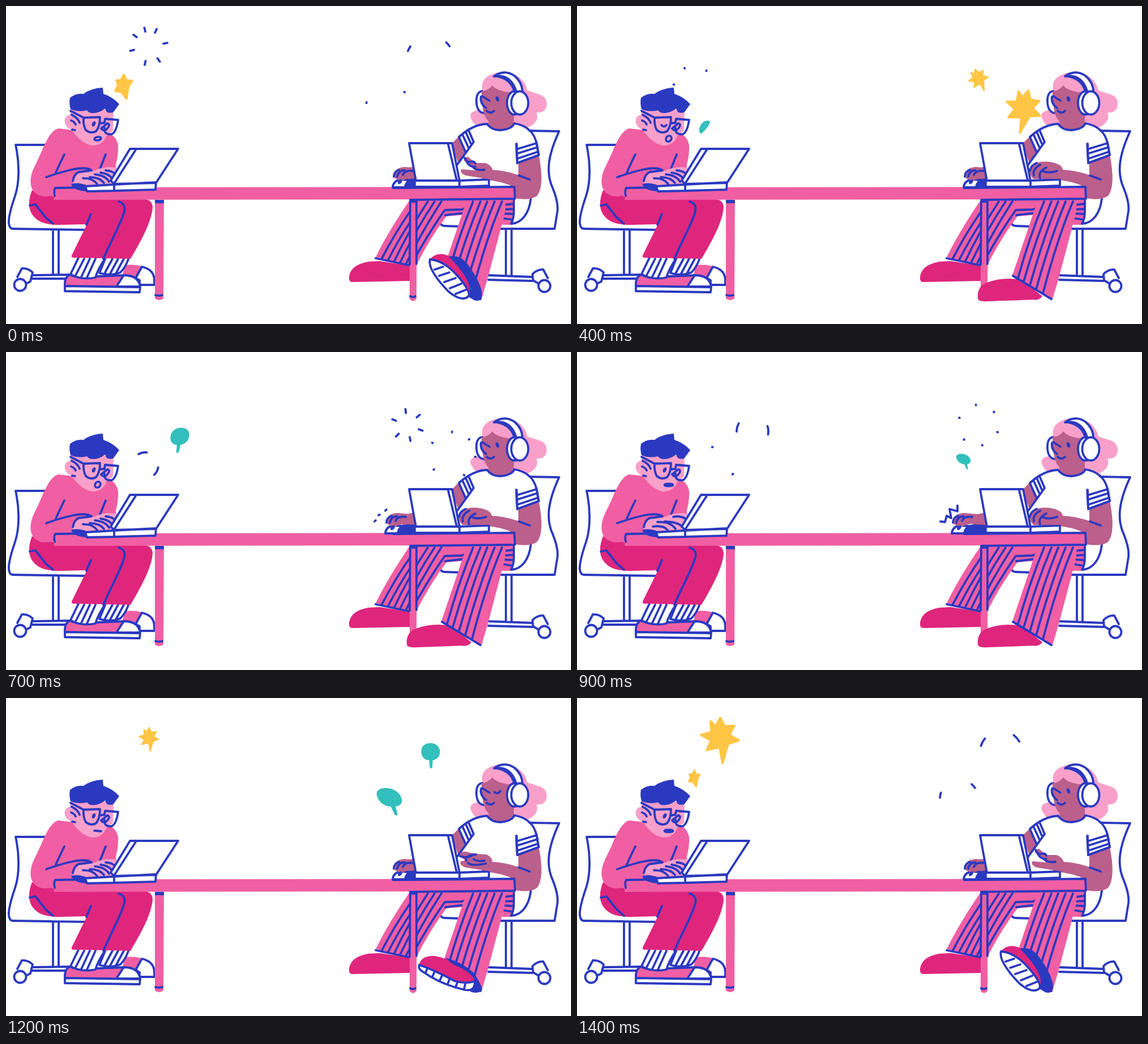
These frames come from a looping animation (998 by 561 pixels, 1.5 s). An HTML page:

```html
<!DOCTYPE html>
<html lang="en">
<head>
<meta charset="utf-8">
<title>Two people working</title>
<style>
html, body { margin: 0; height: 100%; overflow: hidden; background: #fff; }
svg { display: block; width: 100vw; height: 100vh; }
path, ellipse, circle { stroke-linecap: round; stroke-linejoin: round; stroke-width: 3.8; }
.line { fill: none; stroke: #2b39c0; }
.white { fill: #fff; stroke: #2b39c0; }
.blank { fill: #fff; }
.blue { fill: #2b39c0; }
.pink { fill: #f05fa3; }
.deep { fill: #df267d; }
.light { fill: #f8a0ca; }
.skin { fill: #bb5f8c; }
.star { fill: #ffc545; stroke: #ffc545; }
.teal { fill: #33bfbc; }
</style>
</head>
<body>
<svg viewBox="0 0 998 561">
  <!-- chairs -->
  <path class="white" d="M75 245L17 245C23 272 25 308 16 335Q4 370 5 383Q6 393 12 393L145 395M83 396V473M93 396V473M46 475L112 474M46 481L114 481M46 475Q44 478 46 481"/>
  <path class="white" d="M20 478L28 463Q39 462 47 470L43 486L35 490"/>
  <circle class="white" cx="25" cy="492" r="10.5"/>
  <path class="white" d="M922 220L977 221C959 260 952 292 966 322Q976 347 974 362L969 393L850 393M883 394V474M893 394V474M852 475L930 478M852 483L930 485M766 380Q768 388 775 388L804 389M927 340C924 366 911 383 893 384"/>
  <path class="white" d="M957 480L949 465Q939 464 930 473L931 484L943 491"/>
  <circle class="white" cx="951" cy="494" r="10.5"/>

  <!-- left person -->
  <path class="pink" d="M210 457Q232 455 246 462L237 484L205 478Z"/>
  <path class="white" d="M240 460Q262 465 262 484L262 492H236V484L229 480Z"/>
  <path class="pink" d="M104 494Q103 478 113 474Q135 484 160 476L208 475L195 495Z"/>
  <path class="white" d="M208 475Q234 475 237 495H195ZM104 494L237 496L236 505L104 503Z"/>
  <path class="line" d="M104 494Q103 478 113 474Q135 484 160 477L210 475"/>
  <path class="white" d="M176 444L165 471Q183 477 202 470Q212 460 217 444M188 446L174 472M198 446L184 472M208 446L194 472"/>
  <path class="white" d="M128 444L114 473Q132 484 158 479Q162 464 176 444M138 446L123 475M148 446L133 478M158 446L143 479"/>
  <path class="deep" d="M46 325C36 350 40 370 62 381Q75 387 100 386L143 385L116 440Q115 444 120 444L220 446C235 420 257 383 259 356Q259 342 245 341L85 336Z"/>
  <path class="line" d="M42 352L52 350L70 373L83 384M150 367L142 386M199 345Q212 349 209 362C205 380 187 411 172 446"/>
  <path class="pink" d="M92 216C74 222 66 253 50 284C38 308 41 335 70 336L195 325L194 280Q199 262 198 245Q196 233 185 226Z"/>
  <path class="line" d="M103 262Q94 280 88 294M71 302C100 292 138 280 151 290M176 262L166 287"/>
  <path class="light" d="M115 178L113 192Q102 194 104 206Q107 216 116 218C129 238 145 247 156 246Q172 244 178 228L189 220L190 184Z"/>
  <path class="blue" d="M114 182Q111 172 113 162Q124 153 137 155Q150 145 171 144L172 155Q188 160 200 173L190 187Q185 190 178 187L175 181Q164 189 154 189Q146 189 143 184Q128 188 114 182Z"/>
  <path class="line" d="M116 192Q127 197 130 206M115 202Q121 204 123 209M117 218L122 219M114 185L137 197L166 196Q166 213 159 221Q150 226 141 219Q136 210 137 197M174 205L175 199L198 201Q195 222 187 226Q173 228 174 215M166 207L174 206M168 216L179 207Q186 209 177 218Q173 222 168 216"/>
  <ellipse data-on="0-3,6-14" class="blue" cx="155" cy="208" rx="3" ry="5" transform="rotate(25 155 208)"/>
  <path data-on="4-5" class="line" d="M149 210Q154 215 158 210"/>
  <ellipse data-on="0" class="line" cx="162" cy="234" rx="6" ry="3" transform="rotate(-10 162 234)"/>
  <ellipse data-on="1-8" class="line" cx="162" cy="234" rx="4.5" ry="5.5" transform="rotate(35 162 234)"/>
  <ellipse data-on="9-11,14" class="line" cx="162" cy="234.5" rx="7.5" ry="2"/>
  <path data-on="12-13" class="line" d="M156 234L168 235"/>

  <!-- right person -->
  <path class="light" d="M842 152Q836 129 857 121C883 110 915 121 921 149L945 157Q956 162 955 175Q953 189 937 188Q944 207 915 217L870 214L830 211Q813 192 826 186Q836 181 845 185Z"/>
  <path class="white" d="M841 150Q830 152 831 170Q832 187 844 189"/>
  <path class="skin" d="M840 150Q851 150 859 140Q867 151 897 153V212Q880 227 853 216L852 203Q840 193 840 150Z"/>
  <path class="line" d="M841 159L854 167M839 160Q837 172 848 180M849 185Q856 191 862 185"/>
  <ellipse data-on="0-10,13-14" class="blue" cx="868" cy="164" rx="3" ry="5" transform="rotate(-20 868 164)"/>
  <path data-on="11-12" class="line" d="M863 166Q869 171 873 164"/>
  <path class="white" d="M862 124Q880 111 898 123Q912 135 912 151H901Q893 123 862 124Z"/>
  <path class="blue" d="M861 122Q893 117 903 150L896 151Q890 128 861 125Z"/>
  <ellipse class="white" cx="898" cy="171" rx="13" ry="20.5"/>
  <ellipse class="white" cx="907.5" cy="171" rx="15" ry="20.5"/>
  <path class="skin" d="M800 230L787 243L800 281L826 241Z"/>
  <path class="blank" d="M850 208Q823 213 801 231L814 257L826 241L798 280Q800 325 850 320L903 295V277L941 263Q937 227 912 212L898 207Q893 219 872 219Q857 218 850 208Z"/>
  <path class="skin" d="M905 275V298Q875 288 850 289L840 306Q880 309 897 320L898 339Q925 344 938 335Q952 318 941 262Z"/>
  <path class="white" d="M903 277L941 263L937 240L901 242Z"/>
  <path class="blank" d="M899 239L938 237V244L902 252Z"/>
  <path class="line" d="M800 231Q824 209 850 208Q857 219 874 219Q894 217 898 207Q931 213 937 242L941 263L903 277L902 243M904 252L937 242M904 260L939 249M904 269L940 257M800 231L811 256M806 226L817 250M812 222L822 245M817 219L826 240L797 280M906 299L925 306"/>
  <path class="deep" d="M606 478Q608 457 640 451L660 450L713 458V485L612 487Q605 487 606 478Z"/>
  <path class="pink" d="M714 341L899 341Q899 372 892 386H877Q870 372 815 368L778 371Q750 408 726 455L715 458L653 443Q675 398 714 341Z"/>
  <path class="line" d="M653 445L715 458M664 445Q687 401 714 362M675 448Q694 411 714 381M686 450Q712 395 745 345M696 453Q723 396 757 345M706 456Q735 397 769 345M726 438Q751 394 775 360L804 359Q814 358 816 348M776 369Q800 366 812 365M880 351L896 349M878 359L896 358M876 366L896 367M876 374L894 377M897 344V366Q896 378 892 384"/>

  <!-- table legs -->
  <path class="pink" d="M263 342H279L278 516Q270 522 263 516ZM713 342H726L725 517Q719 524 713 517Z"/>
  <path class="blue" d="M263 342H279V348H263ZM713 341H727V347H713Z"/>
  <path class="line" d="M264 510Q270 512 276 510M714 512Q719 515 723 512M714 345L713 456M725 345V455"/>

  <!-- front leg and foot -->
  <path data-on="3-11" class="deep" d="M708 516Q706 495 724 488Q752 477 785 483L822 512Q816 520 806 518L725 521Q708 522 708 516Z"/>
  <path class="pink" d="M814 342H882Q884 360 876 385L852 476L840 517L769 475Z"/>
  <path class="line" d="M770 476L838 517M779 480Q799 408 825 345M789 486Q811 409 838 345M800 493Q823 411 850 345M811 500Q835 413 863 345M823 507Q847 414 876 345"/>
  <g data-on="13-14,0">
    <path class="deep" d="M748 448Q762 430 786 443Q822 470 822 508L815 512Q790 470 748 448Z"/>
    <path class="blue" d="M782 442Q800 437 815 455Q841 490 841 511Q839 523 827 519L817 513Q829 489 782 442Z"/>
    <path class="white" d="M749 447Q744 465 782 504Q805 523 817 512Q821 504 801 480Q775 449 749 447ZM757 465L772 460M765 476L783 470M774 487L794 480M784 498L804 490M794 508L814 500"/>
  </g>
  <g data-on="1-2,12">
    <path class="deep" d="M729 473Q732 455 754 455Q777 457 800 473Q831 485 829 506L805 507Z"/>
    <path class="blue" d="M775 458Q807 466 828 487Q842 510 841 515Q834 523 820 518L828 505Q831 487 790 470Z"/>
    <path class="white" d="M730 471Q757 480 792 499Q810 505 828 500Q829 518 811 515Q767 505 735 482Q728 478 730 471ZM744 477L741 485M757 483L753 492M770 490L766 499M783 497L780 505M797 502L794 511M811 505L809 514"/>
  </g>

  <!-- table top -->
  <path class="pink" d="M87 320L898 319L900 341L84 342Z"/>
  <path class="line" d="M86 335Q84 325 87 321L145 320M684 321L898 319L899 340L714 342"/>

  <!-- left laptop and hands -->
  <path class="light" d="M117 312Q117 294 134 290L155 291Q175 281 198 286L190 317L140 318Z"/>
  <path class="blue" d="M115 314Q127 310 142 316V327Q120 326 115 314Z"/>
  <path class="white" d="M185 308L219 252H304L265 312L191 314ZM229 254L191 313M140 318L191 315L265 311L264 324L191 326L143 327ZM191 316V325"/>
  <path class="line" d="M118 309Q120 297 128 293L151 290"/>
  <path data-on="0-7,11-14" class="line" d="M136 304Q152 303 161 314M148 302Q165 302 173 312M157 297Q176 299 182 310M167 294Q182 296 187 304M176 290Q188 291 192 296"/>
  <path data-on="8-10" class="line" d="M134 308Q152 305 160 314M142 300Q165 299 174 312M155 299Q180 300 186 309M170 291Q180 288 192 294"/>

  <!-- mouse, its hand, right laptop -->
  <path class="skin" d="M700 288L725 282V310H700Z"/>
  <g id="mouse">
    <path class="white" d="M683 320Q684 308 698 306L724 308V320Z"/>
    <path class="blue" d="M703 321Q704 305 722 304L757 306V321Z"/>
    <path class="skin" d="M684 298Q689 284 705 284L738 287V303Q714 301 698 309L687 304Z"/>
    <path class="line" d="M685 301Q685 292 694 289M691 301Q693 290 704 290M701 298Q705 289 719 291"/>
    <ellipse class="blue" cx="696" cy="310" rx="3" ry="5" transform="rotate(40 696 310)"/>
  </g>
  <path class="white" d="M712 242H788L801 308H724ZM781 244L796 307M722 308H801L853 306V317L801 319L722 319ZM801 309V319"/>
  <g data-on="13-14,0-1">
    <path class="skin" d="M856 306L812 299Q801 295 804 288L829 290L809 273Q808 266 816 266L829 277L847 277Q858 281 860 290Z"/>
    <path class="line" d="M810 268L816 276Q827 272 829 278M814 275Q818 284 829 284M824 283Q829 291 845 289"/>
  </g>
  <g data-on="2-3,11-12">
    <path class="skin" d="M856 306L812 299Q800 295 803 288L811 287L802 278Q801 270 812 271L829 275L849 276Q860 282 859 290Z"/>
    <path class="line" d="M802 279Q815 284 826 276M813 287Q809 278 830 276M816 291Q823 297 848 292M826 284Q831 289 845 287"/>
  </g>
  <g data-on="4-10">
    <path class="skin" d="M857 305L806 305Q796 295 801 284Q813 271 840 276Q858 280 858 290Z"/>
    <path class="line" d="M800 291Q802 280 812 277M807 299Q804 288 818 280M818 304Q814 292 829 285M822 291Q833 296 848 291"/>
  </g>
  <path data-on="7" class="line" d="M651 299L653 297M658 288L660 287M670 280L672 278"/>
  <path data-on="8-9" class="line" d="M642 299L650 300L653 289L661 293L658 277L672 281V271"/>
  <path data-on="10" class="line" d="M639 297H640M654 277H655M672 267H673"/>
  <g id="effects"></g>
</svg>
<script>
const STEP = 100, STEPS = 15;
const STAR = "M1-36L9-21L26-22L17-6L34 4L15 10L5 44L0 16L-23 21L-15 4L-33-6L-15-11L-16-30L-7-21Z";
const SMALL_STAR = "M2-20L7-10L17-9L10 2L7 23L-2 11L-13 9L-8-1L-11-10L-3-10Z";
const BUBBLE = "M-21-38C-21-63 21-63 21-38C21-22 8-19 4-18Q4-9 2-1Q0 1-3-1L-4-18Q-21-20-21-38Z";
const DROP = "M-2 0C-9-10-5-22 6-22C14-20 8-8 2 0Q0 2-2 0Z";

// Every effect grows for a few steps, then bursts into three steps of marks.
const stars = [
  { start: 12, x: 252, y: 71, path: STAR, size: 1, turn: 0, r: 30, reach: 12, rays: [-103, -65, -10, 54, 102, 166, 217] },
  { start: 14, x: 206, y: 141, path: SMALL_STAR, size: 1.3, turn: 0, r: 23, reach: 12, rays: [-176, -117, -50] },
  { start: 2, x: 788, y: 182, path: STAR, size: .95, turn: 14, r: 30, reach: 11, rays: [-90, -43, 4, 59, 142, 212] },
  { start: 4, x: 709, y: 129, path: STAR, size: 1, turn: -20, r: 25, reach: 11, rays: [-97, -40, 20, 79, 135, 201] }
];
const bubbles = [
  { start: 4, x: 219, y: 224, lean: -35, flat: .8, cx: 246, cy: 200, r: 23, rays: [-102, 28] },
  { start: 6, x: 303, y: 178, lean: -8, flat: 1, cx: 310, cy: 140, r: 28, rays: [195, -4] },
  { start: 11, x: 751, y: 124, lean: 2, flat: 1, cx: 749, cy: 95, r: 37, rays: [208, -41] },
  { start: 9, grow: 4, x: 690, y: 207, lean: 22, flat: .85, cx: 675, cy: 178, r: 29, rays: [191, -42] }
];

const polar = (x, y, r, deg) => {
  const a = deg * Math.PI / 180;
  return `${x + r * Math.cos(a)} ${y + r * Math.sin(a)}`;
};
const line = d => `<path class="line" d="${d}"/>`;
const shape = (kind, d, e, transform) =>
  `<path class="${kind}" d="${d}" transform="translate(${e.x} ${e.y}) ${transform}"/>`;
const ageOf = (e, step) => (step - e.start + STEPS) % STEPS;

function drawStar(e, step) {
  const age = ageOf(e, step);
  if (age > 5) return "";
  if (age < 3) return shape("star", e.path, e, `rotate(${e.turn}) scale(${e.size * (.52 + .24 * age)})`);
  const burst = (age - 3) / 2, r = e.r + e.reach * burst, half = 3.5 - 3 * burst;
  return line(e.rays.map(a => `M${polar(e.x, e.y, r - half, a)}L${polar(e.x, e.y, r + half, a)}`).join(""));
}

function drawBubble(e, step) {
  const grow = e.grow || 3, age = ageOf(e, step);
  if (age > grow + 2) return "";
  if (age < grow) {
    if (!age && grow === 3) return shape("teal", DROP, e, `skewX(${e.lean / 2})`);
    const s = .57 + .43 * age / (grow - 1);
    return shape("teal", BUBBLE, e, `skewX(${e.lean}) scale(${s} ${s * e.flat})`);
  }
  const burst = age - grow, r = e.r + 5 * burst, half = [7.5, 4.5, .6][burst] / r * 57.3;
  return line(e.rays.map(a =>
    `M${polar(e.cx, e.cy, r, a - half)}A${r} ${r} 0 0 1 ${polar(e.cx, e.cy, r, a + half)}`).join(""));
}

const poses = [...document.querySelectorAll("[data-on]")].map(node => ({
  node,
  ranges: node.dataset.on.split(",").map(part => part.split("-").map(Number))
}));
const mouse = document.getElementById("mouse");
const effects = document.getElementById("effects");
const mouseShift = step => ({ 5: -4, 6: -9, 7: -13, 8: -18, 9: -21, 10: -11 })[step] || 0;

let shown = -1;
function render(now) {
  const step = Math.floor(now / STEP) % STEPS;
  if (step !== shown) {
    shown = step;
    for (const { node, ranges } of poses) {
      const on = ranges.some(([from, to = from]) => step >= from && step <= to);
      node.style.display = on ? "" : "none";
    }
    mouse.setAttribute("transform", `translate(${mouseShift(step)} 0)`);
    effects.innerHTML = stars.map(e => drawStar(e, step)).join("") + bubbles.map(e => drawBubble(e, step)).join("");
  }
  requestAnimationFrame(render);
}
render(performance.now());
</script>
</body>
</html>
```
